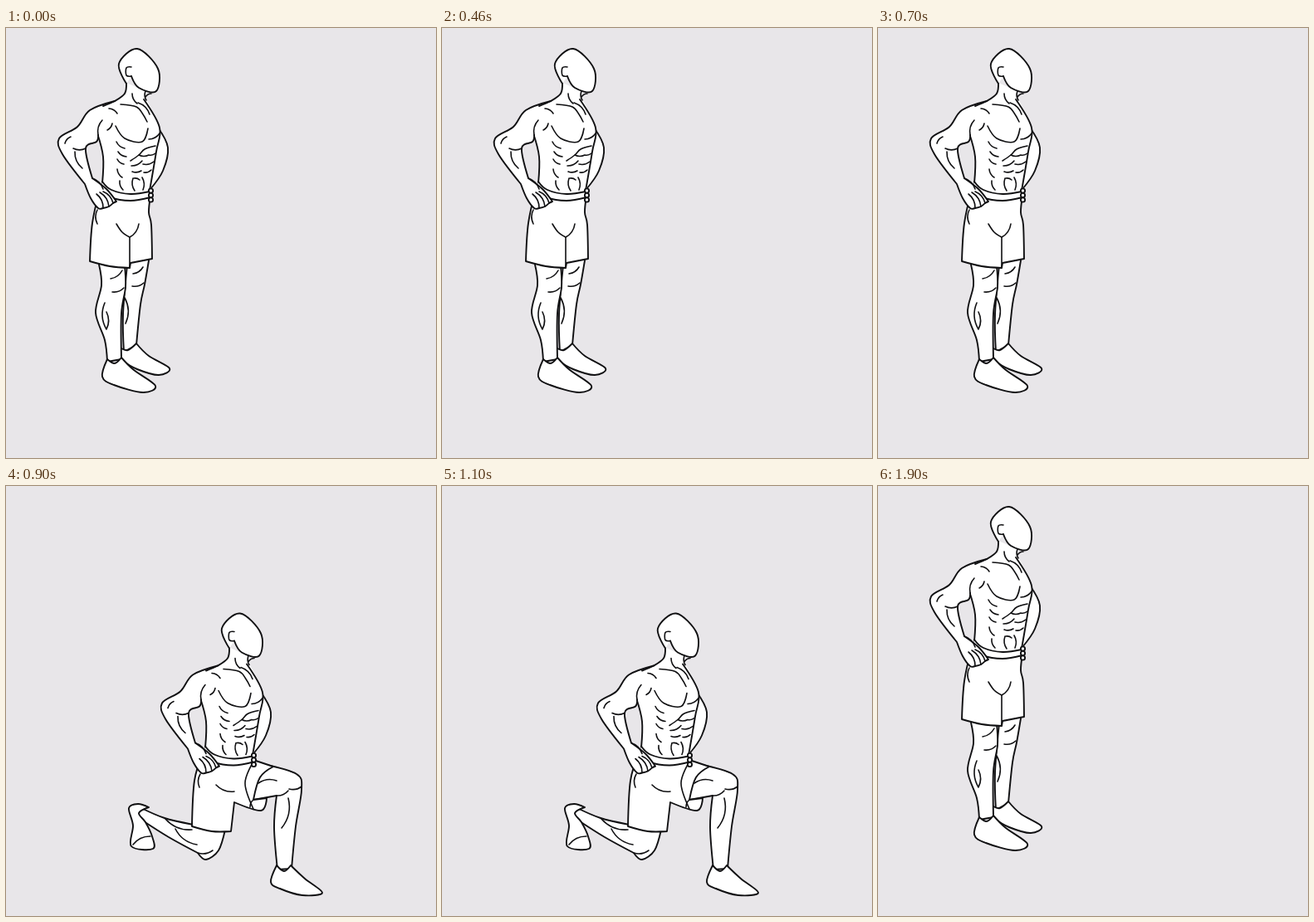
Animation of 518 by 518 pixels, one loop 2000 ms. Source, as an HTML page with a canvas:

```html
<!DOCTYPE html>
<html lang="en">
<head>
<meta charset="utf-8">
<title>Lunge</title>
<style>
html, body { margin: 0; width: 100%; height: 100%; overflow: hidden; background: #e8e6e9; }
canvas { display: block; width: 100%; height: 100%; }
</style>
</head>
<body>
<canvas id="stage" width="518" height="518"></canvas>
<script>
const ctx = document.getElementById("stage").getContext("2d");
const ink = "#101012";

const parse = text => text.split(" ").map(word => {
  const [x, y] = word.split(",").map(parseFloat);
  return { x, y, sharp: word.endsWith("!") };
});

// Smooth curve through the points; "!" marks a corner.
function trace(text) {
  const pts = parse(text);
  const slope = i => {
    const a = pts[i - 1], b = pts[i + 1];
    return !a || !b || pts[i].sharp ? [0, 0] : [(b.x - a.x) / 6, (b.y - a.y) / 6];
  };
  ctx.beginPath();
  ctx.moveTo(pts[0].x, pts[0].y);
  for (let i = 1; i < pts.length; i++) {
    const p = pts[i - 1], q = pts[i], [px, py] = slope(i - 1), [qx, qy] = slope(i);
    ctx.bezierCurveTo(p.x + px, p.y + py, q.x - qx, q.y - qy, q.x, q.y);
  }
}

function line(text, width = 1.6) {
  trace(text);
  ctx.lineWidth = width;
  ctx.stroke();
}

function patch(text) {
  trace(text);
  ctx.fill();
}

function shape(text) {
  patch(text);
  ctx.lineWidth = 1.9;
  ctx.stroke();
}

// Short strokes from point to point, each bowed to its right.
function ticks(...pairs) {
  ctx.lineWidth = 1.6;
  ctx.beginPath();
  for (const pair of pairs) {
    const [a, b] = parse(pair), dx = b.x - a.x, dy = b.y - a.y;
    ctx.moveTo(a.x, a.y);
    ctx.quadraticCurveTo(a.x + dx / 2 - dy / 4, a.y + dy / 2 + dx / 4, b.x, b.y);
  }
  ctx.stroke();
}

function standingLegs() {
  // far side
  shape("146,286 141,345 142,390! 157,382! 162,333 167,309 172,280");
  shape("139,386 147,388 157,380! 172,395 197,410 184,418 158,411 139,400");
  // near side
  shape("112,285 115,310 108,343 119,376 122,402! 139,399! 139,344 144,312 143,287");
  shape("122,399! 131,404 139,397! 154,412 180,431 165,439 130,430 116,420 122,399!");
  ticks("126,302 140,292", "128,318 142,313", "119,331 121,363", "121,363 121,342",
    "144,356 143,325", "153,296 165,288", "152,311 166,307");
  // shorts
  shape("113,195 104,235 101,281! 125,287 149,289! 150,283! 176,278! 175,237 172,222 174,202");
  line("149,289 149,252! 140,246 133,236");
  ticks("149,252 160,236", "110,219 110,236");
}

function lungingLegs() {
  // trailing leg
  shape("161,387 191,400 226,408 264,414! 256,439 241,450 231,442! 196,423 163,402");
  shape("172,387! 159,383 148,388 153,409 151,434 177,437 176,422 168,405 160,394 172,387!");
  ticks("192,401 224,414", "204,413 230,432", "231,442 249,439", "174,422 153,432");
  // leading leg
  shape("309,335 350,347 356,366 349,410 344,461! 327,462! 323,411 326,373! 298,378");
  shape("326,457! 335,464 343,457! 360,473 381,490 357,493 330,485 319,477 326,457!");
  ticks("326,355 304,358", "326,373 340,367", "341,365 356,362", "332,412 340,376");
  // shorts
  shape("237,323 227,355 224,410! 248,416 271,416! 275,381! 307,391 314,376! 298,378! 306,351 322,338! 298,330");
  line("298,332 288,358 298,389");
  ticks("298,378 294,387", "253,360 275,368", "234,347 233,363");
}

function torso() {
  // far arm
  shape("183,120 195,144 189,172 174,194! 174,157");
  patch("145,66! 143,79 131,88! 102,99! 110,130! 117,155 116,188! 145,202 174,199! 181,149 185,120 169,86! 166,75");
  line("110,127 117,155 116,187", 1.9);
  line("166,86 185,120 181,149 173,196", 1.9);
  shape("116,185 127,195 150,200 173,197! 174,204! 150,208 126,204 114,194");
  for (let y = 196; y < 210; y += 5.5) {
    ctx.beginPath();
    ctx.arc(174.5, y, 2.6, 0, 7);
    ctx.fill();
    ctx.stroke();
  }
  // chest
  line("132,118 143,133 164,137 171,121");
  line("138,92 157,95 165,104 170,113");
  ticks("173,104 159,90", "172,134 185,127");
  // ribs
  ticks("133,137 143,145", "135,149 145,155", "134,158 142,164", "134,170 140,180", "137,184 141,195");
  // abdomen
  line("150,160 160,153 167,146 180,142");
  ticks("160,153 172,153", "172,153 180,151", "151,166 164,160", "165,164 178,161", "152,173 163,172",
    "166,174 175,171", "153,181 155,196", "165,195 164,180", "161,183 154,181");
}

function nearArm() {
  shape("131,88 101,99 86,119 64,133 68,152 95,188! 102,205 111,217 117,217 124,215 129,211 133,209! 121,194 104,181! 96,145 109,137 111,129");
  ticks("134,103 124,97", "122,123 128,115", "116,111 111,129", "81,145 96,145", "78,131 71,139", "83,149 92,169");
  ticks("117,217 109,200", "124,215 113,198", "129,211 117,197", "117,194 104,181");
}

function head() {
  line("145,66 143,79 131,88 117,94", 1.9);
  ticks("168,76 169,87", "175,79 168,83", "152,79 158,91");
  shape("145,67 136,43 158,25 183,49 181,76 160,72 151,58");
  line("151,47 145,48 145,57 151,58");
}

function draw(now) {
  const t = now % 2000;
  const down = t >= 900 && t < 1900;
  ctx.clearRect(0, 0, 518, 518);
  ctx.fillStyle = "#fff";
  ctx.strokeStyle = ink;
  ctx.lineCap = ctx.lineJoin = "round";
  ctx.save();
  if (down) {
    lungingLegs();
    ctx.translate(124, 128.5);
  } else {
    standingLegs();
  }
  torso();
  nearArm();
  head();
  ctx.restore();
  requestAnimationFrame(draw);
}
draw(0);
</script>
</body>
</html>
```
